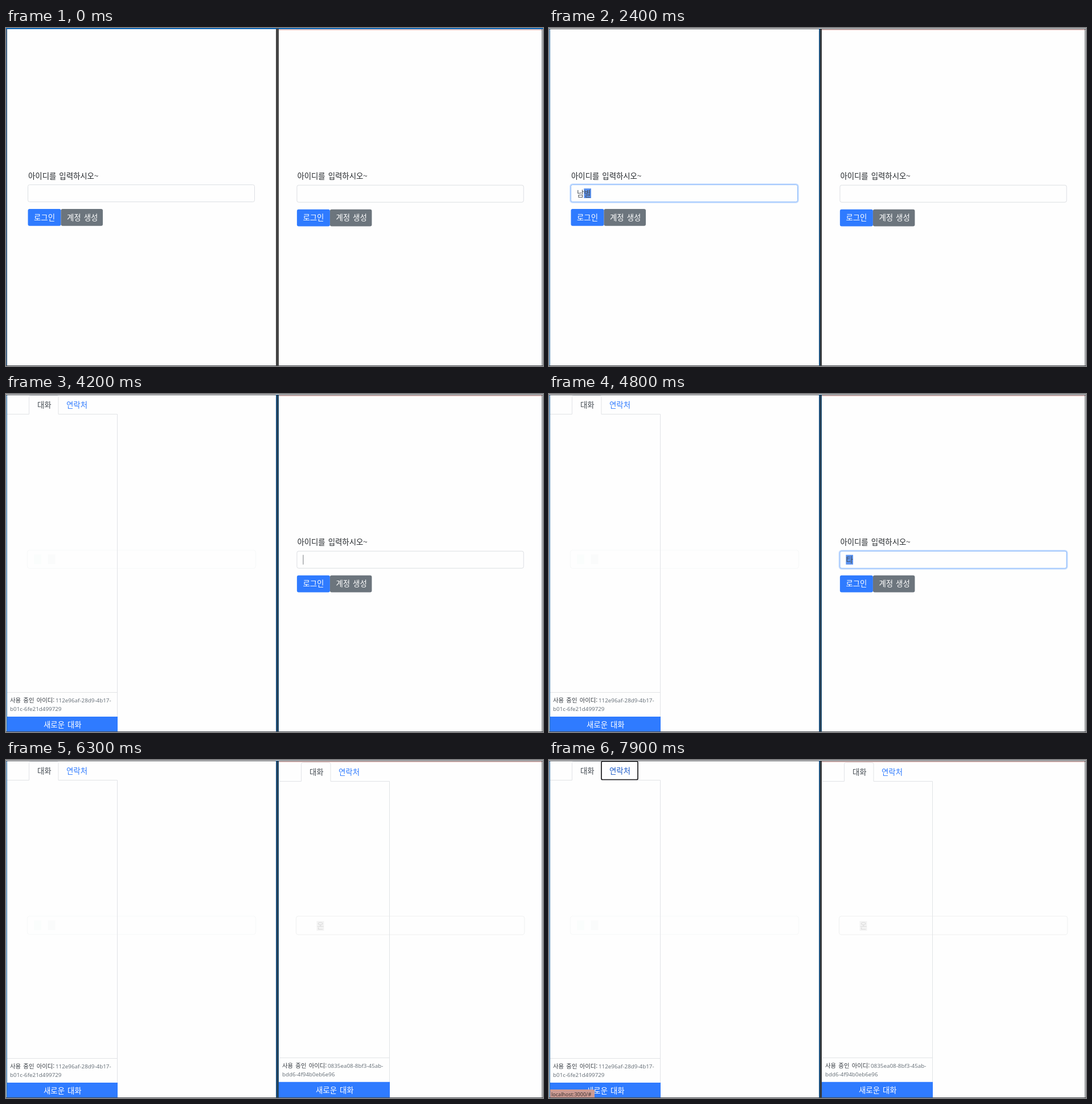
An HTML page that plays this animation: 943 by 594 pixels, repeating every 8 s.

```html
<!DOCTYPE html>
<html lang="ko">
<head>
<meta charset="utf-8">
<style>
html, body { margin: 0; width: 100%; height: 100%; overflow: hidden; background: #fefefe; }
svg { display: block; width: 943px; height: 594px; }
text { font: 13.4px "Noto Sans CJK KR", "Noto Sans CJK", sans-serif; word-spacing: 1.3px; white-space: pre; }
.small { font-size: 10.4px; }
.id { font: 9.8px "Noto Sans", "Open Sans", sans-serif; }
.url { font: 9px "Noto Sans", "Open Sans", sans-serif; }
</style>
</head>
<body>
<svg id="stage" viewBox="0 0 943 594"></svg>
<script>
const LOOP = 8000, STEP = 100, CHAR = 12.33;
const BLUE = '#2f7bff', GRAY = '#6c757d', DARK = '#565d63', LINE = '#e1e3e6';
const stage = document.getElementById('stage');

const box = (x, y, w, h, fill, rx = 0) =>
  `<rect x="${x}" y="${y}" width="${w}" height="${h}" rx="${rx}" fill="${fill}"/>`;
const frame = (x, y, w, h, color, rx = 3, width = 1) =>
  `<rect x="${x}" y="${y}" width="${w}" height="${h}" rx="${rx}" fill="none" stroke="${color}" stroke-width="${width}"/>`;
const label = (x, y, s, fill = '#212529', cls = '') =>
  `<text x="${x}" y="${y}" fill="${fill}" class="${cls}">${s}</text>`;
const line = d => `<path d="${d}" fill="none" stroke="${LINE}"/>`;
const group = (x, y, s) => `<g transform="translate(${x} ${y})">${s}</g>`;

// Typing steps: [start time, text, state]; "compose" marks the last syllable, "caret" shows the cursor
const typing = {
  left: [[0, '', ''], [800, '', 'caret'], [1300, '', ''], [1500, 'ㄴ', 'compose'], [1900, '나', 'compose'],
    [2100, '남', 'compose'], [2200, '남ㅂ', 'compose'], [2300, '남벼', 'compose'], [2400, '남별', 'compose'],
    [2500, '남별ㅅ', 'compose'], [2600, '남별소', 'compose'], [2700, '남별솔', 'caret'], [3100, '남별솔', '']],
  right: [[0, '', ''], [4200, '', 'caret'], [4800, '타', 'compose'], [4900, '탁', 'compose'],
    [5000, '탁ㅅ', 'compose'], [5100, '탁새', 'compose'], [5300, '탁새온', 'caret'], [5800, '탁새온', '']]
};

function field(t, steps) {
  const [, text, state] = steps.filter(s => s[0] <= t).pop();
  const end = 49 + text.length * CHAR;
  let s = '';
  if (state === 'compose') s += box(end - CHAR, 282, CHAR + .3, 17, '#5a92f0');
  s += label(49, 295.7, text, '#495057');
  if (state === 'caret') s += box(Math.floor(end), 282, 1, 17, '#777b80');
  return s;
}

function login(t, steps, { focus, hover, press }) {
  const pressed = t >= press;
  const focused = t >= focus && !pressed;
  const border = focused ? '#8dbbfb' : pressed ? '#c6d9ef' : '#dcdfe3';
  return label(39, 264.7, '아이디를 입력하시오~') +
    (focused ? frame(37.5, 274.5, 400, 32, '#c4dcff', 4, 2.6) : '') +
    frame(38.5, 275.5, 398, 30, border) +
    field(t, steps) +
    box(38.5, 318, 58, 29.7, BLUE, 3) +
    (pressed ? frame(96, 317.5, 74.5, 30.5, '#b3b8bc', 4, 2) : '') +
    box(96.5, 318, 73.5, 29.7, t >= hover ? DARK : GRAY, 3) +
    label(49, 337.6, '로그인', '#fff') + label(107, 337.6, '계정 생성', '#fff');
}

// Chat sidebar; the top and bottom parts shift separately between windows
function chat(x, top, bottom, id, linkColor) {
  const tabs = line('M2 35.5H40.5V5.5Q40.5 2.5 43.5 2.5H89Q92 2.5 92 5.5V35.5H195.5V525') +
    label(55, 23.7, '대화', '#495057') + label(106, 23.7, '연락처', linkColor);
  const foot = line('M2 524.5H195.5V567') +
    label(7, 542.3, '사용 중인 아이디:', '#343a40', 'small') +
    label(87, 542.3, id[0], GRAY, 'id') + label(7, 557.2, id[1], GRAY, 'id') +
    box(1, 567, 195, 30, BLUE) + label(66, 586.3, '새로운 대화', '#fff');
  return group(x, top, tabs) + group(x, bottom, foot);
}

function borders(t) {
  const idle = t < 600, rightActive = t >= 4200 && t < 6900;
  return box(479, 2.5, 462, 1.3, '#dba9a5') +
    (idle ? box(0, 0, 943, 2, '#0b64b4') : box(0, 1, 943, 1, '#30343a')) +
    box(0, 2, 1, 592, idle ? '#5a7594' : '#b4c8da') +
    box(1, 2, 1, 592, idle ? '#2b5174' : '#2f6ea3') +
    box(474, 1, 5, 593, idle ? '#444' : '#35373a') +
    (idle ? '' : box(474, 1, 2, 593, '#1c5484')) +
    (rightActive ? box(477, 1, 2, 593, '#1d4a6c') : '') +
    box(941, 2, 1, 592, '#3c3f44') + box(0, 593, 943, 1, '#45484d');
}

function leftPane(t) {
  if (t < 3600) return login(t, typing.left, { focus: 900, hover: 3400, press: 3500 });
  const ghost = frame(37.5, 274.5, 401, 32, '#f8f9f9', 4, 1.5) +
    box(49, 282, 13, 17, '#fafdfc') + box(73.5, 282, 13, 17, '#fafbfb');
  return ghost + chat(0, 0, 0, ['112e96af-28d9-4b17-', 'b01c-6fe21d499729'], t >= 7500 ? '#1c5bc8' : BLUE) +
    (t >= 7900 ? frame(92, 2.5, 64, 32, '#1c1c1e', 2, 1.7) : '') +
    (t >= 7800 ? `<path d="M0 579H77Q80 579 80 582V594H0Z" fill="#cd9b93"/>` +
      label(4, 590.7, 'localhost:3000/#', '#3d3434', 'url') : '');
}

function rightPane(t) {
  if (t < 6300) return group(472.4, .7, login(t, typing.right, { focus: 4300, hover: 6000, press: 6200 }));
  const ghost = frame(509.5, 274.5, 401, 32.5, '#f3f4f4', 4, 1.5) +
    box(545.5, 283, 13, 17, '#f3f3f3') + label(546, 296.3, '온', '#dcdcdc');
  return ghost + chat(478, 2, -1.2, ['0835ea08-8bf3-45ab-', 'bdd6-4f94b0eb6e96'], BLUE);
}

let shown = -1;
function tick() {
  const t = Math.floor(performance.now() % LOOP / STEP) * STEP;
  if (t !== shown) {
    shown = t;
    stage.innerHTML = box(0, 0, 943, 594, '#fefefe') + leftPane(t) + rightPane(t) + borders(t);
  }
  requestAnimationFrame(tick);
}
tick();
</script>
</body>
</html>
```
